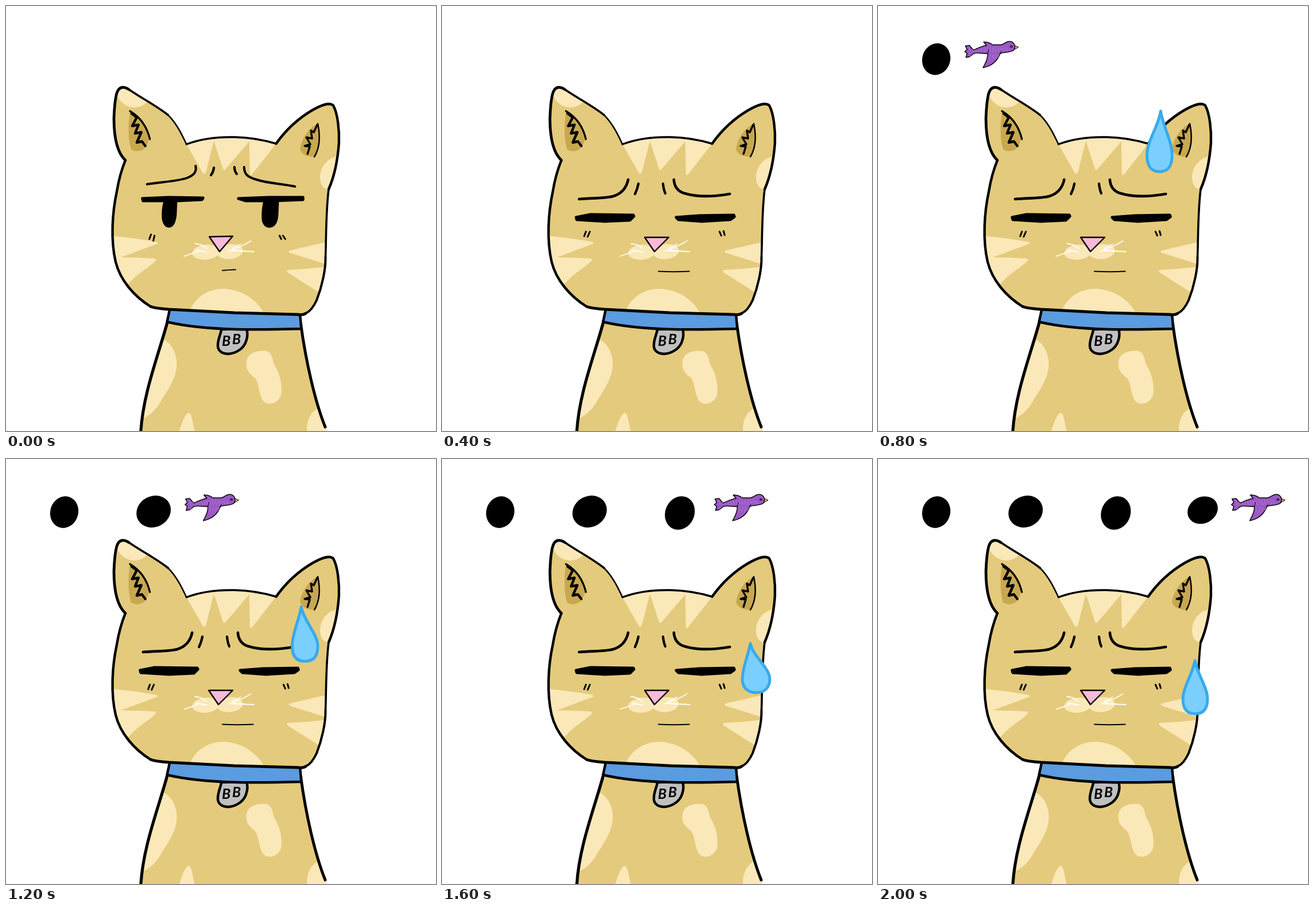
Recreate the animation shown at these times as an HTML page with a canvas. Size 753 by 744 pixels, loop 2400 ms.

```html
<!DOCTYPE html>
<html lang="en">
<head>
<meta charset="utf-8">
<title>Awkward cat</title>
<style>
  html, body { margin: 0; width: 100%; height: 100%; overflow: hidden; background: #fff; }
  canvas { display: block; }
</style>
</head>
<body>
<canvas id="stage" width="753" height="744"></canvas>
<script>
const ctx = document.getElementById('stage').getContext('2d');
const STEP = 400, STEPS = 6;
const INK = '#000', FUR = '#e4ca7c', CREAM = '#fbe8b8', SHADE = '#c8a84f';

function fill(d, color) {
  ctx.fillStyle = color;
  ctx.fill(new Path2D(d));
}

function line(d, width, color = INK) {
  ctx.strokeStyle = color;
  ctx.lineWidth = width;
  ctx.stroke(new Path2D(d));
}

function shape(d, color, width, ink = INK) {
  fill(d, color);
  line(d, width, ink);
}

function oval(x, y, rx, ry, tilt, color) {
  ctx.fillStyle = color;
  ctx.beginPath();
  ctx.ellipse(x, y, rx, ry, tilt, 0, 7);
  ctx.fill();
}

function patches(area, list) {
  ctx.save();
  ctx.clip(new Path2D(area));
  list.forEach(d => fill(d, CREAM));
  ctx.restore();
}

// Head outline: pen width, start point, curve to the next start
const HEAD = [
  [4.8, '209 270', 'C194 256 189 228 189 197 C190 170 193 153 196 148 C200 141 207 141 215 146'],
  [3.6, '215 146', 'C240 163 264 175 284 191'],
  [2.5, '284 191', 'C299 206 308 225 316 242'],
  [3.4, '316 242', 'C345 231 375 229 400 229.5 C427 230 453 235 473 241'],
  [4.4, '473 241', 'C490 217 513 196 537 182 C553 173 566 168 573 174 C581 188 584 218 583 240 C581 268 575 298 565 321'],
  [3.6, '565 321', 'C560 362 561 400 559.5 440'],
  [4, '559.5 440', 'C560 462 553 492 544 515 C538 528 532 535 525 538'],
  [4.8, '525 538', 'C521 541 517 541 510 540 L400 537 L285 531 C272 530 260 529 253 526'],
  [4.4, '253 526', 'C224 508 200 480 192 448 C183 410 186 362 194 325 C198 300 203 285 209 270']
];
const HEAD_AREA = 'M209 270 ' + HEAD.map(s => s[2]).join(' ') + 'Z';
const HEAD_PATCHES = [
  'M316 242 L344 291 Q347 296 350 291 L364 236 L380 285 Q382 289 385 285 L426 237 L427 294 Q429 299 433 292 L473 241 L400 220Z',
  'M190 140 C194 178 229 187 247 168 L215 135Z',
  'M590 263 C562 261 549 284 550 302 C551 316 558 321 567 322Z',
  'M180 402 Q225 406 263 413 Q268 415 263 417 L201 440 Q232 440 260 442 Q265 444 261 447 C246 461 229 469 214 487 L180 480Z',
  'M570 411 L497 428 Q493 430 497 432 L557 451 L556 457 Q525 461 494 462 Q490 464 494 467 L546 500 L570 490Z',
  'M323 531 C333 507 358 494 383 495 C414 497 439 514 452 538Z'
];

const BODY_AREA = 'M284 548 C269 606 240 676 236 746 L562 746 L559 737 C541 692 525 622 516 555Z';
const BODY_PATCHES = [
  'M273 582 C290 590 300 608 299 630 C297 656 280 677 268 697 C259 711 249 718 238 723 L230 620Z',
  'M303 746 C308 730 314 712 321 712 C326 716 327 732 331 746Z',
  'M421 628 C420 606 440 603 455 604 C468 606 466 622 472 632 C480 645 484 664 482 680 C478 694 462 701 452 693 C442 683 444 661 436 651 C428 645 421 639 421 628Z',
  'M550 702 C532 711 526 726 527 746 L570 746Z'
];

function body() {
  fill(BODY_AREA, FUR);
  patches(BODY_AREA, BODY_PATCHES);
  line('M284 548 C269 606 240 676 236 746', 5.2);
  line('M516 555 C525 622 541 692 559 737', 5);

  shape('M377 566 C377 573 370 584 371 596 C372 605 380 609 389 609 C404 608 416 599 420 588 C423 580 424 573 421 565Z', '#c0c0c0', 4.4);
  ctx.fillStyle = INK;
  ctx.font = 'italic 700 25px Lato, sans-serif';
  ctx.fillText('B', 378, 595);
  ctx.fillText('B', 396, 591.5);

  shape('M287 530 L515 540 L517 565 C440 567 350 569 282 553Z', '#5b9bdf', 4.4);
}

function head() {
  fill(HEAD_AREA, FUR);
  patches(HEAD_AREA, HEAD_PATCHES);

  fill('M217 185 C214 205 213 232 219 251 C229 257 240 254 245 246 L252 232 C246 210 235 195 217 185Z', SHADE);
  line('M217 184 C236 195 247 212 252 233', 3.2);
  line('M220 188 L229 195 L221 210 L232 208 L226 223 L237 221 L229 239 L238 237 L244 245', 4.4);

  fill('M546 206 C529 213 516 236 515 251 C519 262 530 264 541 264 C550 248 550 222 546 206Z', SHADE);
  line('M546 206 C551 230 549 249 540 264', 2.5);
  line('M545 208 L539 221 L534 218 L536 232 L526 230 L533 242 L523 245 L532 246 L528 259', 3.4);

  HEAD.forEach(([w, from, d]) => line('M' + from + d, w));
}

const TIRED = {
  lids: ['M239 337 L285 335 L345 336 L343 339 L300 341 L240 341Z', 'M407 337 L460 335 L520 335 L520 339 L470 341 L420 341Z'],
  pupils: ['M276 341 C273 352 272 363 273 373 C275 384 280 388 286 388 C295 387 298 376 299 364 L300 341Z',
           'M451 341 C448 352 447 365 448 375 C450 385 456 389 463 388 C472 387 476 378 477 366 L478 341Z'],
  brows: 'M247 312 C270 308 301 307 317 301 C330 296 334 290 332 280 M417 282 C417 296 425 300 439 304 C460 311 485 311 506 316',
  browPen: 4,
  frown: 'M364 283 Q363 291 359 296 M400 282 Q400 289 404 294',
  marks: 'M254 400 L251 408 M260 402 L258 411 M479 402 L482 408 M485 402 L489 408',
  mouth: 'M379 463 Q390 462 402 461.5',
  nose: 'M356 404 L397 403 L374 430Z'
};
const CLOSED = {
  lids: ['M235 370 L260 365 L335 366 L336 368 L329 375 L285 377 L236 374Z', 'M410 370 L450 367 L511 366 L512 369 L505 374 L455 377 L414 374Z'],
  pupils: [],
  brows: 'M240 338 C265 336 285 337 300 333 C316 328 323 318 326 304 M406 304 C407 317 414 325 425 328 C450 336 480 333 504 329',
  browPen: 4.6,
  frown: 'M344 311 Q342 321 338 329 M387 311 Q388 321 391 328',
  marks: 'M252 395 L249 403 M259 395 L255 404 M486 395 L489 402 M493 394 L495 401',
  mouth: 'M379 464.5 Q405 466 433 464.5',
  nose: 'M355 405 L397 405 L372 430Z'
};

function face(f) {
  oval(350, 431, 24, 13, -0.1, CREAM);
  oval(392, 430, 23, 13, -0.1, CREAM);
  line('M312 438 L338 429 M331 416 Q343 417 351 424 M333 427 L351 431 M390 429 Q412 422 429 411 M397 424 L411 417 M394 428 L434 430', 1.8, '#fff');

  f.pupils.forEach(d => fill(d, INK));
  f.lids.forEach(d => shape(d, INK, 5));
  line(f.brows, f.browPen);
  line(f.frown, 4.2);
  line(f.marks, 3);
  line(f.mouth, 2);
  shape(f.nose, '#fbb9da', 2.4);
}

// Drop: tip, side edges and bottom
const DROPS = [
  [495, 184, 471, 515, 290],
  [517, 259, 501, 546, 354],
  [540, 323, 526, 574, 409],
  [555, 353, 534, 577, 446]
];

function drop([x, y, l, r, b]) {
  const h = b - y, mid = (l + r) / 2, side = b - h * 0.28;
  shape(`M${x} ${y} C${x - 4} ${y + h * 0.25} ${l} ${b - h * 0.5} ${l} ${side}
    C${l} ${b - 8} ${mid - 14} ${b} ${mid} ${b} C${mid + 14} ${b} ${r} ${b - 8} ${r} ${side}
    C${r} ${b - h * 0.5} ${x + 4} ${y + h * 0.25} ${x} ${y}Z`, '#7acfff', 5, '#38aaea');
}

const DOTS = [
  [102, 93, 24.5, 28, 0.3],
  [258.5, 92, 31, 27, -0.5],
  [416.5, 94.5, 25.5, 30, 0.4],
  [568.5, 89.5, 27.5, 23, -0.5]
];
const BIRD_X = [0, 161.5, 325, 467];
const BIRD = 'M167 77 L160 69 L153 70 L156 76 L152 80 L156 83 L154 90 L160 89 L168 83 C176 81 184 84 192 83 ' +
  'C193 94 187 101 184 108 C199 105 209 97 214 83 C222 80 232 82 238 77 C242 70 238 62 230 62 ' +
  'C223 62 222 67 215 68 L201 68 C196 64 190 63 185 63 L190 69 C182 70 175 74 167 77Z';

function bird(x) {
  ctx.save();
  ctx.translate(x, 0);
  shape('M239 69 L246 72 L239 76Z', '#f0b64a', 1);
  shape(BIRD, '#9a59c4', 1.5);
  ctx.save();
  ctx.clip(new Path2D(BIRD));
  for (let i = 0; i < 14; i++) {
    const sx = 160 + i * 5;
    line(`M${sx} 73 l2 7 M${sx + 2} 85 l-2 8`, 0.8, '#b783d8');
  }
  ctx.restore();
  line('M192 83 L194 76 M214 83 L216 79', 1);
  oval(233, 71, 3, 2.5, 0, '#6b3591');
  oval(234, 71, 1.3, 1.3, 0, INK);
  ctx.restore();
}

function draw(now) {
  const step = Math.floor(now / STEP) % STEPS;
  ctx.fillStyle = '#fff';
  ctx.fillRect(0, 0, 753, 744);
  ctx.lineCap = ctx.lineJoin = 'round';
  body();
  head();
  face(step ? CLOSED : TIRED);

  const count = step - 1;
  if (count > 0) {
    DOTS.slice(0, count).forEach(d => oval(...d, INK));
    bird(BIRD_X[count - 1]);
    drop(DROPS[count - 1]);
  }
}

function tick() {
  draw(performance.now());
  requestAnimationFrame(tick);
}
tick();
</script>
</body>
</html>
```
